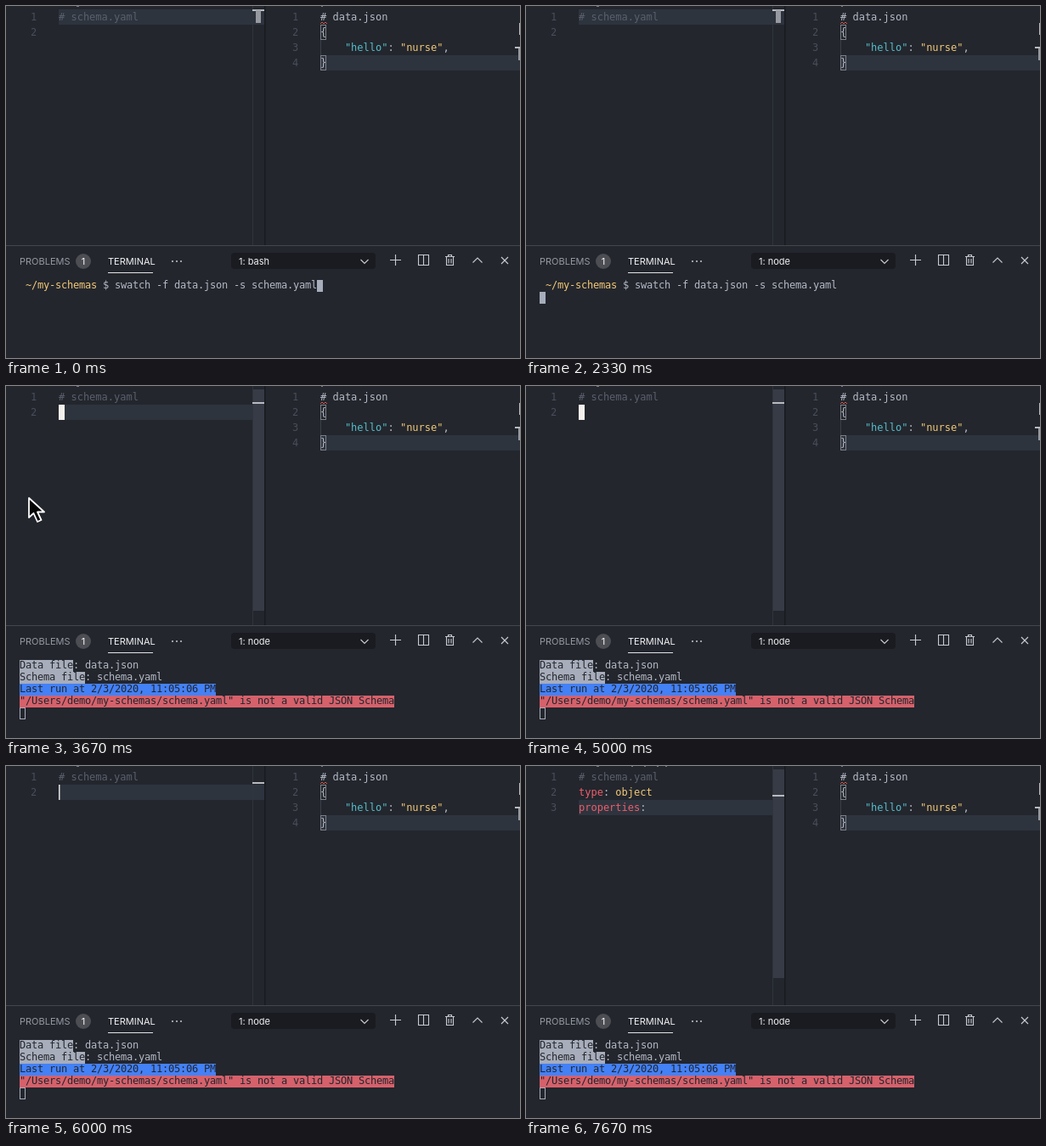
These frames come from a looping animation (605x415 px, 8 s). An HTML page:

```html
<!DOCTYPE html>
<html lang="en">
<head>
<meta charset="utf-8">
<title>Schema check in an editor</title>
<style>
  html, body { margin: 0; width: 100%; height: 100%; overflow: hidden; background: #23262d; }
  svg { display: block; width: 605px; height: 415px; }
  text { white-space: pre; }
  .code { font: 12px "DejaVu Sans Mono", "Liberation Mono", monospace; }
  .term { font: 12px "DejaVu Sans Mono", "Liberation Mono", monospace; letter-spacing: -0.224px; }
  .ui { font: 11px Inter, "Liberation Sans", sans-serif; }
  .icon { fill: none; stroke: #c8cbd1; stroke-width: 1.1; }
</style>
</head>
<body>
<svg id="stage" viewBox="0 0 605 415"></svg>
<script>
const NS = "http://www.w3.org/2000/svg";
const stage = document.getElementById("stage");
const LOOP = 8000;
const COL = 12 * 1233 / 2048;   // editor character width
const C = {
  bg: "#23262d", line: "#2e343e", fg: "#b5bac5", dim: "#5a606c", num: "#484e5a",
  key: "#ec5f6c", str: "#f3c977", cyan: "#55bdcb", block: "#a7adba",
  blue: "#4381f7", red: "#d6616b", mark: "#b9bbbf", slider: "#363b46"
};

function add(tag, attrs, parent = stage) {
  const el = document.createElementNS(NS, tag);
  for (const k in attrs) el.setAttribute(k, attrs[k]);
  parent.appendChild(el);
  return el;
}
const group = () => add("g", {});
const rect = (x, y, width, height, fill, parent) => add("rect", { x, y, width, height, fill }, parent);
const path = (d, attrs, parent) => add("path", { d, ...attrs }, parent);
function text(cls, x, y, parts, parent, attrs = {}) {
  const el = add("text", { class: cls, x, y, ...attrs }, parent);
  for (const [str, fill] of parts) add("tspan", { fill }, el).textContent = str;
  return el;
}
const show = (el, on) => el.setAttribute("visibility", on ? "visible" : "hidden");
const rowTop = n => 4 + 18 * (n - 1);
const code = (x, row, parts, parent) => text("code", x, rowTop(row) + 13, parts, parent);
const termTop = n => 323 + 14 * n;
const term = (x, row, parts, parent) => text("term", x, termTop(row) + 10, parts, parent);
const lineNo = (right, n) => code(right - COL, n, [[n, C.num]]);

// panes
rect(0, 0, 605, 415, C.bg);
const rowBand = rect(62, 4, 242, 18, C.line);
const slider = rect(290, 4, 14, 261, C.slider);
rect(290, 0, 1, 282, "#30343c");
rect(304, 0, 1.5, 282, "#181a1f");
rect(0, 282, 605, 1, "#42464e");
const rulerMark = rect(290, 4, 14, 2, C.mark);
const wordMark = rect(294, 5, 6, 15, "#96999f");

// left editor
const leftNos = [1, 2, 3].map(n => lineNo(36.3, n));
const caretBlock = rect(62, 4, 7, 18, "#f4f1ec");
const caretBar = rect(62, 4, 1.5, 18, "#e4e4e4");
const title = code(62, 1, [["# schema.yaml", C.dim]]);
const typeKey = code(62, 2, [["type", C.key], [":", C.fg]]);
const typeVal = code(62 + 6 * COL, 2, [["object", C.str]]);
const propKey = code(62, 3, [["properties", C.key], [":", C.fg]]);
const coverChar = code(62, 1, [["#", C.bg]]);
const crumbs = group();
rect(83, 0, 3, 1, "#747983");
const crumbRest = group();
for (const x of [124, 139, 154, 164]) rect(x, 0, 2, 1, "#747983", crumbRest);

// right editor
rect(370, 58, 235, 18, C.line);
rect(370, 40, 1, 18, "#3a3f49");
[1, 2, 3, 4].forEach(n => lineNo(344.3, n));
for (const y of [22.5, 58.5])
  add("rect", { x: 370.5, y, width: 6, height: 17, fill: "none", stroke: "#7c8087" });
code(370, 1, [["# data.json", C.fg]]);
code(370, 2, [["{", C.fg]]);
code(370 + 4 * COL, 3, [['"hello"', C.cyan], [": ", C.fg], ['"nurse"', C.str], [",", C.fg]]);
code(370, 4, [["}", C.fg]]);
path("M370 21l2-2 2 2 2-2 2 2", { fill: "none", stroke: "#d05a4e", "stroke-width": 1 });
rect(371, 0, 2, 1, "#747983");
rect(604, 20, 1, 14, C.mark);
rect(599, 48, 6, 2, C.mark);
rect(603, 50, 2, 14, "#96999f");

// panel header
text("ui", 16, 305, [["PROBLEMS", "#9599a1"]]);
add("circle", { cx: 91, cy: 301, r: 9, fill: "#4c4e54" });
text("ui", 91, 305, [["1", "#fff"]], stage, { "text-anchor": "middle", "font-weight": 600 });
text("ui", 120, 305, [["TERMINAL", "#f0f1f3"]]);
rect(120, 314, 53, 1, "#e4e5e8");
for (const x of [196, 201, 206]) add("circle", { cx: x, cy: 301, r: 1, fill: "#c8cbd1" });
add("rect", { x: 265, y: 291, width: 170, height: 19, rx: 4, fill: "#191b20" });
const shell = text("ui", 274, 305, [["", "#f0f1f3"]]).firstChild;
[
  "M417.5 299l4.5 4.5 4.5-4.5",
  "M458.5 293v13M452 299.5h13",
  "M485.5 293.5h12v12h-12zM491.5 293.5v12",
  "M517 295.5h11M520.5 295.5v-2h4v2M518.5 295.5v10h8v-10M521 298v5.5M524 298v5.5",
  "M549.5 302.5l5.5-5.5 5.5 5.5",
  "M583 296l8 8M591 296l-8 8"
].forEach(d => path(d, { class: "icon" }));

// terminal
const prompt = group();
term(23, 0, [["~/my-schemas", C.str], [" $ swatch -f data.json -s schema.yaml", C.fg]], prompt);
const report = group();
[
  ["Data file", ": data.json", C.block],
  ["Schema file", ": schema.yaml", C.block],
  ["Last run at 2/3/2020, 11:05:06 PM", "", C.blue],
  ['"/Users/demo/my-schemas/schema.yaml" is not a valid JSON Schema', "", C.red]
].forEach(([head, tail, fill], i) => {
  rect(16, termTop(i), head.length * 7, 14, fill, report);
  term(16, i, [[head, C.bg], [tail, C.fg]], report);
});
const termBlock = rect(366, 323, 7, 14, C.block);
const termHollow = add("rect", { x: 16.5, y: 379.5, width: 6, height: 13, fill: "none", stroke: C.block });

const pointer = path("M0 0v23l5.5-5 4.5 10 4.5-2-4.5-9.500h8z",
  { fill: "#050505", stroke: "#fff", "stroke-width": 1.8, "stroke-linejoin": "round" });

// editor phases: start, caret row, caret kind, row highlight, slider height
const phases = [
  [0, 1, "", true, 0],
  [3330, 1, "", true, 261],
  [3670, 2, "block", true, 261],
  [4000, 2, "", true, 261],
  [4330, 2, "block", true, 261],
  [4670, 2, "", true, 261],
  [5000, 2, "block", false, 261],
  [5330, 1, "block", true, 0],
  [6000, 2, "bar", true, 0],
  [7000, 2, "block", false, 0],
  [7330, 3, "bar", true, 246],
  [7670, 3, "", true, 246]
];

function draw(t) {
  const [, row, caret, lit, thumb] = phases.filter(p => p[0] <= t).pop();
  const y = rowTop(row);
  const ran = t >= 2670, clicked = t >= 3670;
  const hasType = t >= 6330, hasVal = t >= 6670, hasProps = t >= 7670;

  show(rowBand, lit);
  rowBand.setAttribute("y", y);
  show(slider, thumb > 0);
  slider.setAttribute("height", thumb);
  rulerMark.setAttribute("y", row === 1 ? 4 : row === 2 ? 19 : 34);
  show(wordMark, !clicked);
  show(leftNos[1], t < 5330 || t >= 6000);
  show(leftNos[2], t >= 7330);

  show(typeKey, hasType);
  show(typeVal, hasVal);
  show(propKey, hasProps);
  show(crumbRest, hasType);

  show(caretBlock, caret === "block");
  caretBlock.setAttribute("y", y);
  show(caretBar, caret === "bar");
  caretBar.setAttribute("y", y);
  const typed = row === 2 ? (hasVal ? 12 : hasType ? 6 : 0) : 0;
  caretBar.setAttribute("x", 62 + typed * COL);
  const under = row === 1 ? "#" : hasVal ? "t" : "";
  show(coverChar, caret === "block" && under !== "");
  coverChar.firstChild.textContent = under;
  coverChar.setAttribute("y", y + 13);

  shell.textContent = t < 2330 ? "1: bash" : "1: node";
  show(prompt, !ran);
  show(report, ran);
  show(termBlock, !clicked);
  termBlock.setAttribute("x", t < 2330 ? 366 : 16);
  termBlock.setAttribute("y", t < 2330 ? 323 : ran ? 379 : 337);
  show(termHollow, clicked);

  show(pointer, t >= 3330 && t < 4000);
  pointer.setAttribute("transform", clicked ? "translate(27 132)" : "translate(13 170)");
}

const start = performance.now();
function tick(now) {
  draw(Math.max(0, now - start) % LOOP);
  requestAnimationFrame(tick);
}
draw(0);
requestAnimationFrame(tick);
</script>
</body>
</html>
```
